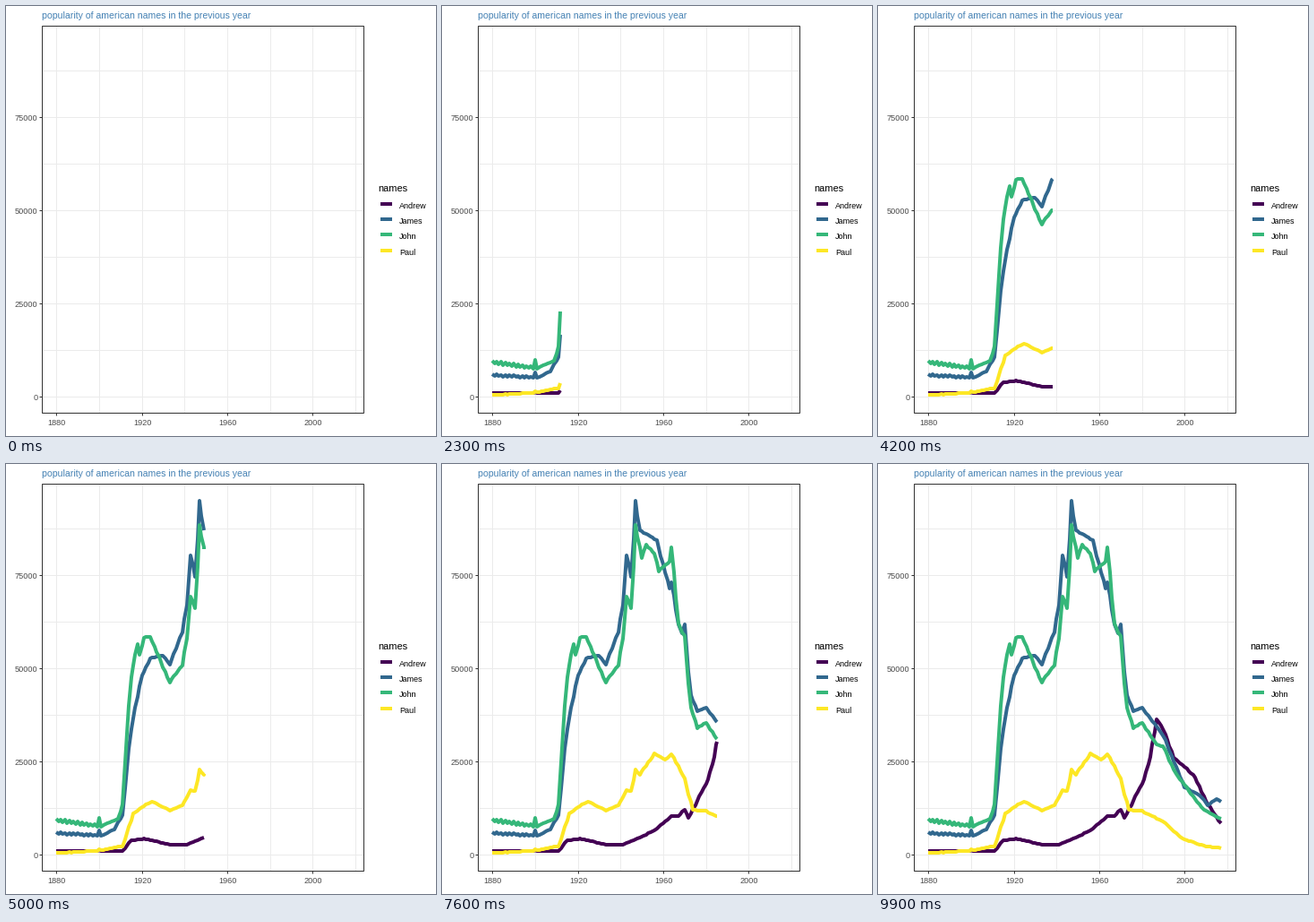
Recreate the animation shown at these times as a matplotlib script. Size 480 px wide and 480 px high, loop 10000 ms.

```python
import numpy as np
import matplotlib.pyplot as plt
from matplotlib.animation import FuncAnimation
from matplotlib.patches import Rectangle

SIZE, DPI = 480, 72
FRAMES, INTERVAL = 100, 100
START, END = 1880, 2017
LEFT, TOP, RIGHT, BOTTOM = 40, 22, 399, 454
GRID, DARK, GREY = "#EBEBEB", "#333333", "#4D4D4D"
YEARS = np.arange(START, END + 1)

plt.rcParams["font.family"] = "Liberation Sans"


def px(year):
    return np.floor(56.8 + 2.382 * (year - START))


def py(count):
    return np.floor(436.2 - count / 240.4)


def series(*turns):
    """Yearly counts from turning points given as (year, thousands)."""
    years, thousands = zip(*turns)
    counts = 1000 * np.interp(YEARS, years, thousands)
    # Even years run high before 1900, which itself is a spike.
    counts *= np.where(YEARS < 1900, 1 + 0.04 * (-1.0) ** YEARS, 1)
    counts[YEARS == 1900] *= 1.28
    return counts


GROUPS = [
    ("Andrew", "#440154", series(
        (1880, 0.85), (1911, 0.95), (1915, 3.7), (1921, 4.2), (1934, 2.5),
        (1941, 2.6), (1949, 4.4), (1957, 6.8), (1964, 10.3), (1967, 10.2),
        (1970, 12), (1972, 9.8), (1981, 20.1), (1984, 26.2), (1987, 36.2),
        (1990, 33.7), (1995, 25.9), (2000, 23.5), (2005, 20.7), (2010, 14.3),
        (2017, 8.3))),
    ("James", "#31688E", series(
        (1880, 5.7), (1901, 5), (1907, 6.6), (1911, 10.5), (1912, 17.7),
        (1915, 33.7), (1920, 47.9), (1924, 52.6), (1930, 53.3), (1933, 51),
        (1939, 59.6), (1941, 66.7), (1943, 80.3), (1945, 74.5), (1947, 94.8),
        (1949, 87), (1957, 84.3), (1963, 71.3), (1964, 73.1), (1967, 61.7),
        (1969, 59.3), (1970, 61.8), (1973, 42.7), (1976, 38.4), (1980, 39.3),
        (1990, 32), (2000, 18), (2007, 15.9), (2011, 13.2), (2015, 14.8),
        (2017, 14.2))),
    ("John", "#35B779", series(
        (1880, 9.2), (1901, 7.5), (1909, 9.6), (1911, 13.4), (1912, 24.6),
        (1915, 47.6), (1918, 56.5), (1919, 53.5), (1921, 58.2), (1924, 58.4),
        (1933, 46.2), (1939, 50.7), (1941, 57.9), (1943, 69.1), (1945, 66),
        (1947, 88.3), (1950, 79.4), (1952, 83), (1956, 80.6), (1958, 76),
        (1963, 78.6), (1964, 82.5), (1967, 62), (1970, 58.5), (1973, 39.4),
        (1976, 33.9), (1980, 35.3), (1987, 29.4), (1990, 29), (1996, 21.5),
        (2009, 12), (2017, 9.5))),
    ("Paul", "#FDE725", series(
        (1880, 0.3), (1900, 1), (1911, 2.2), (1916, 10.9), (1921, 13),
        (1925, 14.1), (1933, 11.8), (1939, 13.2), (1943, 17.3), (1945, 16.9),
        (1947, 22.7), (1949, 21.4), (1956, 27), (1961, 25.4), (1964, 26.9),
        (1970, 20.4), (1974, 11.9), (1980, 11.6), (1990, 8.8), (1999, 4.2),
        (2010, 2.1), (2017, 1.7))),
]

fig = plt.figure(figsize=(SIZE / DPI, SIZE / DPI), dpi=DPI, facecolor="white")
ax = fig.add_axes([0, 0, 1, 1])
ax.set_xlim(0, SIZE)
ax.set_ylim(SIZE, 0)
ax.axis("off")


def rule(xs, ys, color):
    ax.plot(xs, ys, color=color, lw=1, solid_capstyle="butt", zorder=1)


def label(x, y, text, size, color, ha="left"):
    ax.text(x, y, text, fontsize=size, color=color, ha=ha, va="baseline")


def thick(xs, ys, color):
    return ax.plot(xs, ys, color=color, lw=4, zorder=3,
                   solid_capstyle="butt", solid_joinstyle="round")[0]


for year in range(1880, 2021, 20):
    x = px(year)
    rule([x, x], [TOP, BOTTOM], GRID)
    if year % 40 == 0 and year < 2020:
        rule([x, x], [BOTTOM, BOTTOM + 3], DARK)
        label(x + 0.5, 467.6, str(year), 9.1, GREY, "center")

for count in range(0, 90000, 12500):
    y = py(count)
    rule([LEFT, RIGHT], [y, y], GRID)
    if count % 25000 == 0:
        rule([LEFT - 3, LEFT], [y, y], DARK)
        label(35.3, y + 4, str(count), 9.1, GREY, "right")

ax.add_patch(Rectangle((LEFT, TOP), RIGHT - LEFT, BOTTOM - TOP, fill=False,
                       ec=DARK, lw=1, zorder=5))

label(40, 14, "popularity of american names in the previous year", 10.45,
      "steelblue")
label(415.2, 207, "names", 11, "black")

lines = []
for i, (name, color, _) in enumerate(GROUPS):
    y = np.floor(221.3 + 17.28 * i)
    thick([418, 431], [y, y], color)
    label(438.8, y + 4.8, name, 9, "black")
    lines.append(thick([], [], color))


def update(i):
    now = START + (END - START) * i / (FRAMES - 1)
    past = YEARS < now
    xs = np.append(YEARS[past], now) if i else np.array([])
    for line, (_, _, counts) in zip(lines, GROUPS):
        line.set_data(px(xs), py(np.interp(xs, YEARS, counts)))
    return lines


def reset():
    return update(0)


anim = FuncAnimation(fig, update, frames=FRAMES, init_func=reset,
                     interval=INTERVAL, repeat=True, repeat_delay=0)
plt.show()
```
